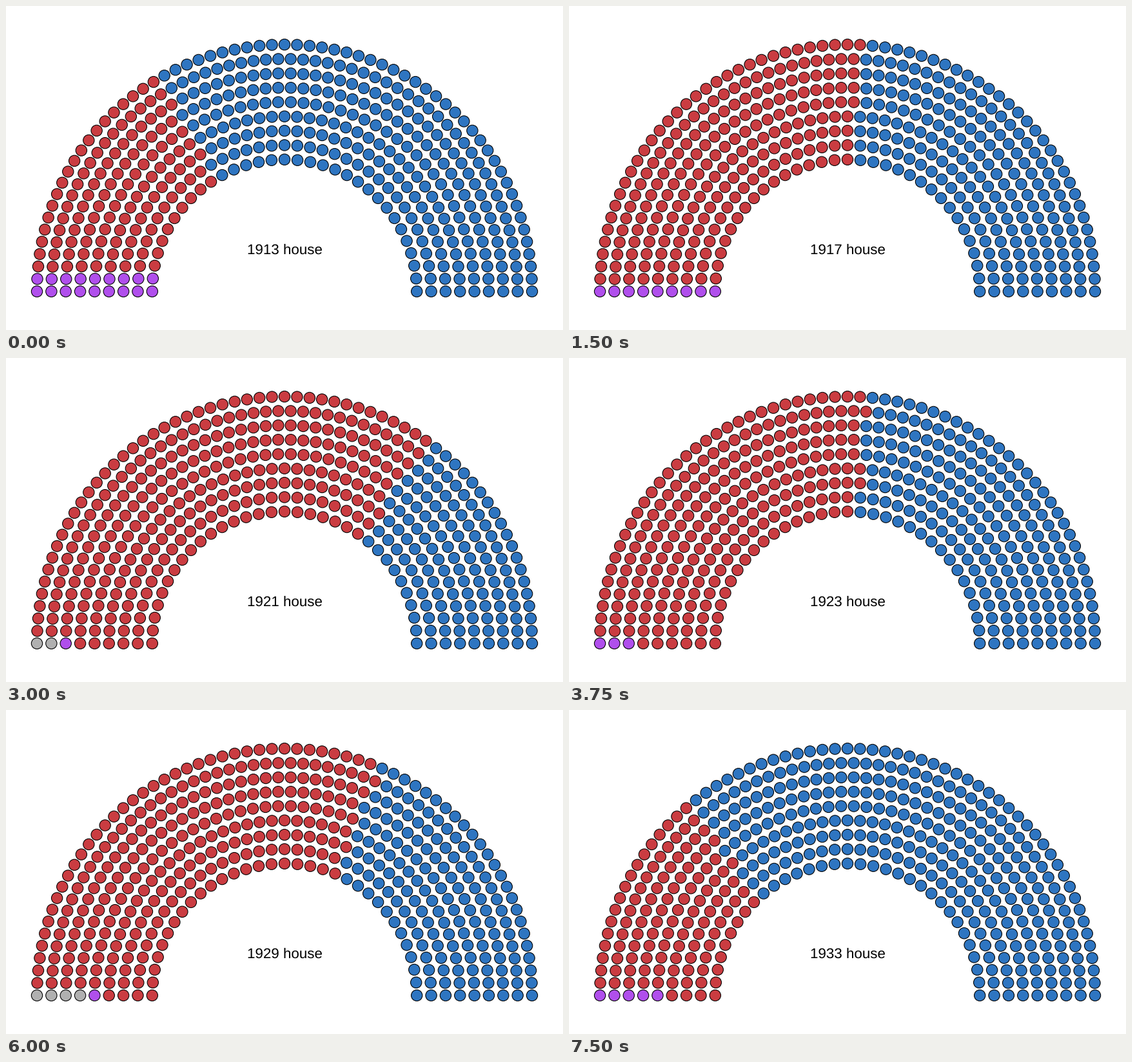
A matplotlib script that plays this animation: 864 px wide and 504 px high, repeating every 8000 ms.

```python
import numpy as np
import matplotlib.pyplot as plt
from matplotlib.animation import FuncAnimation
from matplotlib.collections import EllipseCollection
from matplotlib.colors import to_rgba_array

W, H, DPI = 864, 504, 72          # at 72 dpi one point is one pixel
STEP_MS, HOLD = 250, 3            # each house stays for three steps
FRAMES = 32

CX, CY = 432, 444
OUTER, INNER, ROWS = 384, 205.2, 9
SEAT_R, LINE = 8.65, 1.1

FIRST_YEAR, TOTAL = 1913, 435
DEMOCRATS = [290, 231, 210, 191, 132, 207, 183, 195, 163, 217, 313]
OTHERS = [18, 8, 9, 7, 1, 3, 5, 3, 1, 1, 5]
VACANT = {1915: 3, 1921: 2, 1929: 4}

# vacant, other, Republican, Democrat: the order of filling from the left
COLORS = to_rgba_array(["#b0b0b0", "#b04fec", "#ca3c41", "#2e75c1"])


def seat_centers():
    """Seats sorted by angle from the left; at equal angles outer rows first."""
    radii = np.linspace(OUTER, INNER, ROWS)
    gaps = np.ceil(np.linspace(62, 32, ROWS)).astype(int)
    angle = np.concatenate([np.linspace(0, np.pi, g + 1) for g in gaps])
    radius = np.repeat(radii, gaps + 1)
    order = np.lexsort((-radius, angle.round(9)))
    angle, radius = angle[order], radius[order]
    return np.column_stack([CX - radius * np.cos(angle),
                            CY - radius * np.sin(angle)])


def house(i):
    year = FIRST_YEAR + 2 * i
    vacant, other, dem = VACANT.get(year, 0), OTHERS[i], DEMOCRATS[i]
    return year, [vacant, other, TOTAL - vacant - other - dem, dem]


plt.rcParams["text.hinting"] = "none"
fig = plt.figure(figsize=(W / DPI, H / DPI), dpi=DPI, facecolor="white")
ax = fig.add_axes([0, 0, 1, 1])
ax.set(xlim=(0, W), ylim=(H, 0))
ax.axis("off")

size = np.full(TOTAL, 2 * SEAT_R)
seats = EllipseCollection(size, size, np.zeros(TOTAL), units="xy",
                          offsets=seat_centers(),
                          offset_transform=ax.transData,
                          edgecolors="black", linewidths=LINE)
ax.add_collection(seats)
label = ax.text(CX, 387, "", ha="center", va="baseline",
                family="Liberation Sans", size=22.4, color="black")


def draw(frame):
    year, counts = house(frame // HOLD)
    seats.set_facecolor(np.repeat(COLORS, counts, axis=0))
    label.set_text(f"{year} house")
    return seats, label


anim = FuncAnimation(fig, draw, frames=FRAMES, init_func=lambda: draw(0),
                     interval=STEP_MS, repeat=True, repeat_delay=0)
plt.show()
```
